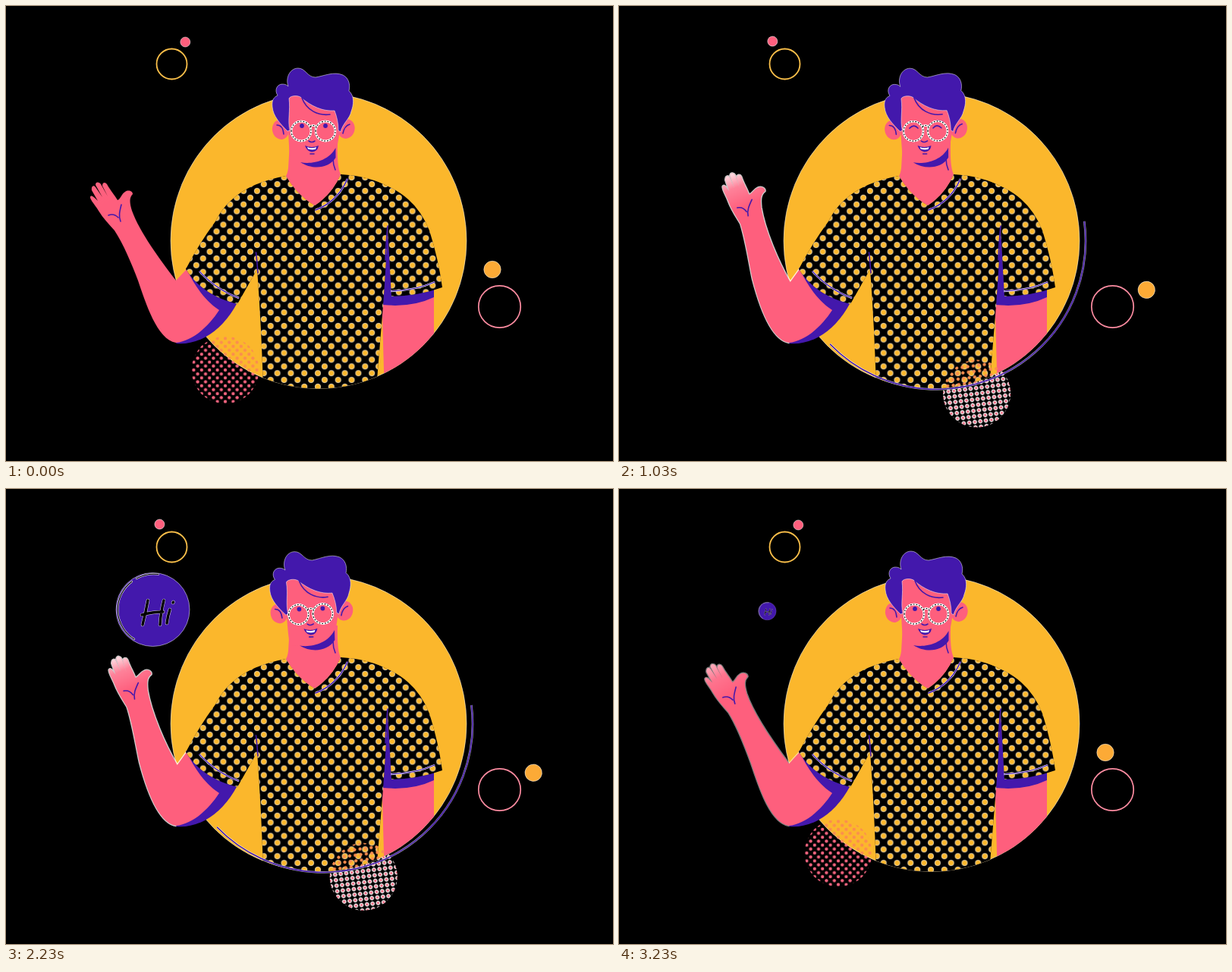
These frames come from a looping animation (800 px wide and 600 px high, 3.26 s). An HTML page:

```html
<!DOCTYPE html>
<html lang="en">
<head>
<meta charset="utf-8">
<title>Waving man</title>
<style>
  html, body { margin: 0; width: 100%; height: 100%; overflow: hidden; background: #000; }
  svg { display: block; width: 100vw; height: 100vh; }
  .skin { fill: #fe5f7d; }
  .ink { fill: #4318ac; }
  .sun { fill: #fbb72c; }
  .line { fill: none; stroke: #4318ac; stroke-width: 1.6; stroke-linecap: round; }
  .thin { stroke-width: 1.2; }
  .glow { fill: none; stroke: #fff; stroke-width: 2.4; }
  .rim { stroke: #fff; stroke-width: .7; stroke-opacity: .7; }
</style>
</head>
<body>
<svg viewBox="0 0 800 600">
  <defs>
    <clipPath id="disc"><circle cx="412" cy="309.5" r="195"/></clipPath>
    <g id="dots">
      <circle cx="8.9" cy="8.9" r="3.7"/>
      <circle cx="0" cy="0" r="3.7"/><circle cx="17.8" cy="0" r="3.7"/>
      <circle cx="0" cy="17.8" r="3.7"/><circle cx="17.8" cy="17.8" r="3.7"/>
    </g>
    <pattern id="polka" x="411" y="502" width="17.8" height="17.8" patternUnits="userSpaceOnUse">
      <use href="#dots" class="sun" stroke="#fff" stroke-width=".6"/>
    </pattern>
    <pattern id="pinkBeads" x="289" y="480" width="10.4" height="10.4" patternUnits="userSpaceOnUse">
      <use href="#dots" fill="#f6647f" transform="scale(.5843)"/>
    </pattern>
    <pattern id="sunBeads" x="289" y="480" width="10.4" height="10.4" patternUnits="userSpaceOnUse">
      <use href="#dots" fill="#fc8d4e" transform="scale(.5843)"/>
    </pattern>
    <pattern id="whiteBeads" x="289" y="480" width="10.4" height="10.4" patternUnits="userSpaceOnUse">
      <use href="#dots" fill="none" stroke="#fff" stroke-width="2" transform="scale(.5843)"/>
    </pattern>
    <linearGradient id="blur" gradientUnits="userSpaceOnUse" x1="148" y1="276" x2="121" y2="234">
      <stop offset=".1" stop-color="#fff" stop-opacity="0"/>
      <stop offset=".65" stop-color="#fff" stop-opacity=".22"/>
      <stop offset="1" stop-color="#fff" stop-opacity=".75"/>
    </linearGradient>
  </defs>
  <rect width="800" height="600"/>

  <!-- orbiting dots -->
  <circle cx="218.5" cy="76.5" r="20" fill="none" stroke="#fbc04a" stroke-width="1.8"/>
  <circle id="pinkDot" class="skin rim" cx="236.3" cy="47.5" r="6.5"/>
  <circle cx="650.5" cy="396.5" r="27.7" fill="none" stroke="#fc8ca1" stroke-width="1.7"/>
  <circle id="sunDot" class="rim" fill="#fcaa36" cx="641" cy="347.5" r="11.2"/>

  <!-- ball part outside the disc -->
  <g class="ball">
    <circle cx="289" cy="480" r="44.5" fill="url(#pinkBeads)"/>
    <circle id="sparkle" cx="289" cy="480" r="44.5" fill="url(#whiteBeads)"/>
  </g>

  <circle class="sun rim" cx="412" cy="309.5" r="195"/>

  <!-- right arm -->
  <g clip-path="url(#disc)">
    <path class="skin" d="M495 375H564V520H499Q497 440 495 375Z"/>
    <path class="ink" d="M503 290Q497 335 496.5 394Q535 398 564 384V370L508 378Z"/>
  </g>

  <!-- left arm -->
  <path id="armHalo" fill="none" stroke="#fff" stroke-width="2.6" stroke-opacity=".8"/>
  <path class="ink" d="M237 345L305 391Q288 423 262 437Q243 447 224 445L250 400Z"/>
  <path id="arm" class="skin"/>
  <path id="armBlur" fill="url(#blur)"/>
  <path id="palm" class="line"/>

  <!-- shirt -->
  <g id="shirt" clip-path="url(#disc)"></g>
  <path class="glow" d="M255 350Q277 374 307 385M507 376Q540 375 565 364"/>
  <path class="line thin" d="M255 350Q277 374 307 385M507 376Q540 375 565 364"/>
  <path class="line" d="M329.5 325Q331 338 332 352M503 290Q501 310 500 335"/>
  <path class="skin" d="M374 180L372 214Q371 221 369 224Q384 250 407 263Q430 248 441 222Q436 212 437 180Z"/>
  <path class="glow" d="M450 228Q437 258 408 269"/>
  <path class="line" d="M450 228Q437 258 408 269"/>
  <path class="line" d="M431 201Q431 209 434 216"/>

  <!-- head -->
  <g id="head">
    <g class="skin">
      <ellipse cx="362" cy="163" rx="11" ry="13" transform="rotate(-12 362 163)"/>
      <ellipse cx="448.5" cy="162" rx="11" ry="13" transform="rotate(14 448.5 162)"/>
    </g>
    <path class="line" d="M357 157Q365 157 366 169M453 156Q446 158 444 168"/>
    <path class="skin" d="M371 116L372 165Q373 190 375 206H400Q428 210 436 188L440 165V118Z"/>
    <path class="ink" d="M388 206C402 209 425 205 434.5 187V200C425 215 403 216 388 206Z"/>
    <path class="ink rim" d="M371 165C361 155 352 145 351 133C350 124 353 120 358 118C353 110 358 103 364 103C368 103 370 104 372 106C368 95 374 82 385 82C395 82 397 94 408 94C420 92 432 86 444 91C452 95 454 104 452 112C460 119 458 131 455 139C453 149 444 154 441 166L438 164C438 154 436 146 433 138C418 139 403 133 388 120C382 117 374 119 373 122C375 138 371 150 374 164Z"/>
    <path class="line" d="M390 121C396 138 412 145 427 143"/>
    <path class="line" d="M399 178Q403 181 407 178M401 195H406"/>
    <path class="ink" d="M394 184Q403 188 412 184Q411 192 403 192.5Q396 191 394 184Z"/>
    <path fill="#fff" d="M397 186Q403 188.5 409 186L408 189Q403 190 398 188.5Z"/>
    <g id="eyes">
      <g id="open" class="ink"><circle cx="390" cy="158" r="2.9"/><circle cx="421" cy="158" r="2.9"/></g>
      <path id="shut" class="line" d="M384 161Q390 155 395 161M415 161Q420 155 426 161"/>
      <path class="line" d="M382 154Q389 150 395 153M415 153Q421 150 428 153"/>
      <path id="glasses" class="glow" d="M376 165a13 13 0 0 1 26 0a13 13 0 0 1 -26 0M408 165a13 13 0 0 1 26 0a13 13 0 0 1 -26 0M401 159Q405 156 409 159"/>
      <use href="#glasses" style="stroke:#000"/>
      <path fill="none" stroke="#000" stroke-width="1.1" stroke-dasharray="1.8 2" d="M376 165a13 13 0 0 1 26 0a13 13 0 0 1 -26 0M408 165a13 13 0 0 1 26 0a13 13 0 0 1 -26 0M401 159Q405 156 409 159"/>
    </g>
  </g>

  <!-- ball part over the disc -->
  <g clip-path="url(#disc)">
    <g class="ball"><circle cx="289" cy="480" r="44.5" fill="url(#sunBeads)"/></g>
  </g>

  <!-- trail along the disc -->
  <g id="trail" fill="none">
    <path pathLength="1" stroke="#fff" stroke-opacity=".7" stroke-width="2.6" d="M278 445.7A196 196 0 0 0 571.3 186.2"/>
    <path pathLength="1" stroke="#4318ac" stroke-width="1.6" d="M278 445.7A196 196 0 0 0 571.3 186.2"/>
  </g>

  <!-- greeting -->
  <g id="bubble" role="img" aria-label="Hi">
    <circle class="ink rim" cx="193.5" cy="159" r="48.5"/>
    <g fill="none" stroke-linecap="round">
      <path stroke="#fff" stroke-width="2.2" d="M201 112.5A47 47 0 0 0 172 118M166 122A46 46 0 0 0 169 198"/>
      <path stroke="#000" stroke-width="1.2" d="M201 112.5A47 47 0 0 0 172 118M166 122A46 46 0 0 0 169 198"/>
      <path stroke="#fff" stroke-opacity=".8" stroke-width="4.4" d="M187 147Q184 163 180 179M179 166Q193 162 207 162M208 147Q204 162 203 179M216 159Q213 168 212 177M220 150L220.5 149"/>
      <path stroke="#000" stroke-width="3.4" d="M187 147Q184 163 180 179M179 166Q193 162 207 162M208 147Q204 162 203 179M216 159Q213 168 212 177M220 150L220.5 149"/>
    </g>
  </g>
</svg>
<script>
const LOOP = 3260, WAVE = LOOP / 7;
const $ = id => document.getElementById(id);
const set = (id, name, value) => $(id).setAttribute(name, value);
const show = (id, on) => set(id, 'visibility', on ? 'visible' : 'hidden');
const clamp = x => Math.max(0, Math.min(1, x));
const smooth = x => (x = clamp(x), x * x * (3 - 2 * x));
const cubic = x => (x = clamp(x), x < .5 ? 4 * x ** 3 : 1 - 4 * (1 - x) ** 3);

const torso = 'M369 224Q384 250 407 263Q430 248 441 222Q478 224 506 239Q542 256 558 296Q570 334 575 371Q545 382 508 383L503 292Q501 340 497 395L488 505H339Q337 430 331 347L305 393Q259 382 237 347Q254 314 276 284C293 250 325 232 369 224Z';
$('shirt').innerHTML = ['#000', 'url(#polka)']
  .map(fill => `<path d="${torso}" fill="${fill}"/>`).join('');

const arm = 'M143 296C136 288 128 280 122 270C118 263 111 256 111 252C112 248 117 253 121 257' +
  'L113 243C112 237 116 236 118 239L127 252L118 236C118 231 123 232 125 235L134 251' +
  'L127 237C127 232 131 232 133 235C138 244 143 249 147 256C151 255 152 248 157 245' +
  'C161 242 167 244 167 248C162 253 163 260 166 270C176 298 204 336 224 362L238 347' +
  'C249 369 262 389 281 401C268 421 248 441 224 444C199 440 184 391 174 362C166 341 155 314 143 296Z';
const palm = 'M135 276Q142 273 148 279M152 262C150 270 148 277 151 284';

// Turns a path about the forearm; the turn fades out towards the elbow.
function bend(path, degrees) {
  return path.replace(/([\d.]+) ([\d.]+)/g, (_, px, py) => {
    const x = px - 200, y = py - 385;
    const a = px > 230 ? 0 : degrees * Math.PI / 180 * clamp((410 - py) / 110);
    const c = Math.cos(a), s = Math.sin(a);
    return (200 + x * c - y * s).toFixed(2) + ' ' + (385 + x * s + y * c).toFixed(2);
  });
}

function draw(t) {
  const mirror = Math.min(t, LOOP - t);
  const orbit = cubic(mirror / 1600), roll = cubic(mirror / 1535);

  set('pinkDot', 'transform', `rotate(${-73 * orbit} 218.5 76.5)`);
  set('sunDot', 'transform', `rotate(${91 * orbit} 650.5 396.5)`);
  for (const ball of document.querySelectorAll('.ball'))
    ball.setAttribute('transform', `rotate(${-60.9 * roll} 412 309.5)`);
  set('sparkle', 'opacity', clamp(roll * 12));

  set('trail', 'stroke-dasharray', `${orbit} 2`);
  show('trail', orbit > .002);

  const phase = 2 * Math.PI * t / WAVE;
  const turn = 13.5 * (1 - Math.cos(phase));
  const speed = clamp(1.6 * Math.abs(Math.sin(phase)));
  const shape = bend(arm, turn);
  for (const id of ['arm', 'armBlur', 'armHalo']) set(id, 'd', shape);
  set('armBlur', 'opacity', speed);
  set('armHalo', 'opacity', speed);
  set('blur', 'gradientTransform', `rotate(${turn} 200 385)`);
  set('palm', 'd', bend(palm, turn));

  const tilt = smooth((t - 350) / 1880) * (1 - smooth((t - 2270) / 480));
  set('head', 'transform', `rotate(${-1.8 * tilt} 403 235)`);
  set('eyes', 'transform', `translate(${-1.2 * tilt} 0)`);
  const shut = t >= 330 && t < 1330;
  show('open', !shut);
  show('shut', shut);

  const grow = 1 - (1 - clamp((t - 1630) / 320)) ** 3;
  const size = grow * (1 - clamp((t - 2934) / 326) ** 3);
  set('bubble', 'transform', `translate(196 161.7) scale(${size}) translate(-196 -161.7)`);
  show('bubble', size > .01);
}

const start = performance.now();
function tick() {
  draw((performance.now() - start) % LOOP);
  requestAnimationFrame(tick);
}
tick();
</script>
</body>
</html>
```
